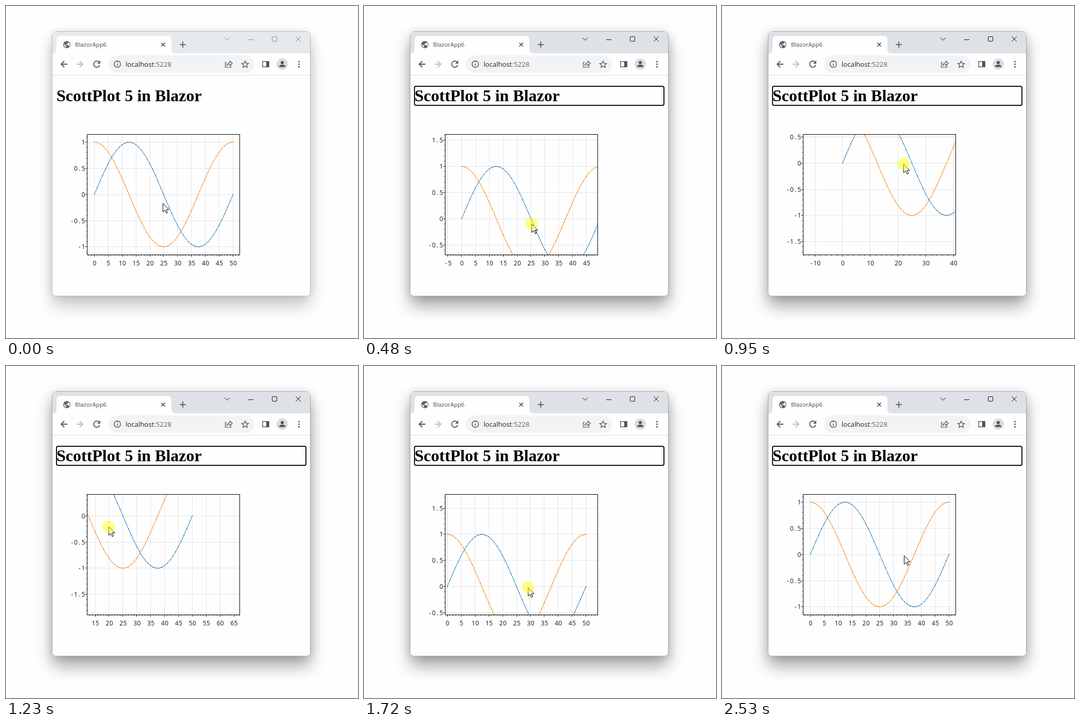
An HTML page with a canvas for the animation above (2.6 s loop, 683 by 645 pixels).

```html
<!DOCTYPE html>
<html lang="en">
<head>
<meta charset="utf-8">
<title>ScottPlot 5 in Blazor</title>
<style>
  html, body { margin: 0; width: 100%; height: 100%; overflow: hidden; background: #fefefe; }
  .window, svg, canvas { position: absolute; left: 0; top: 0; }
  .window {
    left: 90px; top: 50px; width: 500px; height: 513px; border-radius: 8px;
    box-shadow: 0 0 0 1px #b4b8ba, 0 20px 32px rgba(0,0,0,.2), 0 2px 20px rgba(0,0,0,.12);
  }
  .focused .window { box-shadow: 0 0 0 1px #a4a8aa, 0 20px 32px rgba(0,0,0,.34), 0 2px 20px rgba(0,0,0,.15); }
  .bar { fill: #e7eaed; }
  .focused .bar { fill: #dee1e6; }
  .caption { stroke: #85878a; stroke-width: 1; }
  .focused .caption { stroke: #111; }
  .ring { visibility: hidden; }
  .focused .ring { visibility: visible; }
  .line { fill: none; }
  .ui { font-family: "Open Sans", "Noto Sans", sans-serif; }
  .title { font: bold 32px "Liberation Serif", "Times New Roman", serif; }
</style>
</head>
<body>
<div class="window"></div>
<svg width="683" height="645" viewBox="0 0 683 645">
  <rect x="90" y="50" width="500" height="513" rx="7" fill="#fefefe"/>
  <path class="bar" d="M90 92V57q0-7 7-7H583q7 0 7 7V92z"/>
  <path fill="#fefefe" d="M90 92q8 0 8-8V66q0-8 8-8H313q8 0 8 8V84q0 8 8 8z"/>

  <circle cx="118" cy="75" r="7" fill="#5f6368"/>
  <path fill="#fefefe" d="M112.6 74l4 3.5v3l-1.2-.6q-3-2-2.8-5.900zM118 69.500l3.500 1-1.500 2.500-3 .5v2h4l1 2.500 1.200.5q1.500-4-.7-7l-2-1.500z"/>
  <text class="ui" x="134" y="79" font-size="11.4" fill="#45494d">BlazorApp6</text>

  <g class="line" stroke="#45494d" stroke-width="1.6">
    <path d="M301.500 71.500l7 7m0-7l-7 7M337 75h12m-6-6v12"/>
  </g>
  <g class="line caption">
    <path d="M424 61.500l5 5 5-5M470 65.500h10M562 59l10 10m0-10l-10 10"/>
    <rect x="516.5" y="59.500" width="9" height="9" rx="1.500"/>
  </g>

  <path stroke="#dadce0" d="M90 134.500H590"/>
  <rect x="198" y="96" width="284" height="34" rx="17" fill="#f1f3f4"/>
  <g class="line" stroke="#505458" stroke-width="1.800">
    <path d="M119 113h-12m6-6l-6 6 6 6"/>
    <path stroke="#b8babd" d="M137 113h12m-6-6l6 6-6 6"/>
    <path d="M181 109.500a6 6 0 1 0 .9 5M182 106.500v4.500h-4.500"/>
    <g stroke-width="1.400">
      <circle cx="216" cy="113" r="6.300"/>
      <path d="M216 112v4.500m0-8v1.600"/>
      <path stroke-width="1.200" d="M428 109.500h-2.500v9.500h11v-3M428.500 115.500q.5-5 6-5.500v-2.800l4.800 4.300-4.800 4.300v-2.800q-4 0-6 2.500z"/>
      <path d="M464 107l1.900 4.200 4.600.5-3.400 3.100.9 4.500-4-2.300-4 2.300.9-4.500-3.400-3.100 4.600-.5z"/>
      <rect x="498" y="107.800" width="12" height="10.500"/>
    </g>
  </g>
  <path fill="#505458" d="M505 107.500h5.500v11h-5.500z"/>
  <circle cx="536" cy="113" r="11" fill="#dadce0"/>
  <g fill="#505458">
    <circle cx="536" cy="110" r="3"/>
    <path d="M530 118.500v-1q0-3.500 6-3.500t6 3.500v1z"/>
    <circle cx="568.500" cy="108" r="1.600"/>
    <circle cx="568.500" cy="113" r="1.600"/>
    <circle cx="568.500" cy="118" r="1.600"/>
  </g>
  <text class="ui" x="232" y="118" font-size="13.200" fill="#202124">localhost<tspan fill="#5f6368">:5228</tspan></text>

  <text class="title" x="98" y="185">ScottPlot 5 in Blazor</text>
  <rect class="line ring" x="98" y="156" width="484" height="37" rx="3" stroke="#101010" stroke-width="2"/>
</svg>
<canvas width="683" height="645"></canvas>

<script>
const LOOP = 2600;
const LAST_MOVE = 29;
const SCALE = { x: 5.38, y: 101.7 };
const HOME = { x: 171.4, y: 366.2 };
const BOX = { left: 158, top: 249, right: 453, bottom: 483 };
const ctx = document.querySelector('canvas').getContext('2d');
const arrow = new Path2D('M.5.5v16.500l3.800-3.600 2.700 6 2.500-1.100-2.700-5.900h5.200z');

// Mouse path: tick, x, y
const path = [
  [0, 304, 383], [1, 297, 371], [6, 315, 418], [7, 325, 423], [10, 372, 392],
  [13, 359.5, 310], [14, 352, 307], [17, 218, 296], [18, 199, 312],
  [21, 197.5, 408], [22, 213, 423], [25, 318, 430], [28, 353, 368], [29, 353, 368]
];

// Ticks last 70 ms, apart from three that last 60 ms
const tickStart = k => 70 * k - 10 * ((k > 2) + (k > 8) + (k > 11));

function tickAt(time) {
  let k = 0;
  while (k < LAST_MOVE && tickStart(k + 1) <= time) k++;
  return k;
}

function slope(i, axis) {
  const a = path[Math.max(0, i - 1)], b = path[Math.min(path.length - 1, i + 1)];
  return (b[axis] - a[axis]) / (b[0] - a[0]);
}

function mouseAt(k) {
  let i = 0;
  while (i < path.length - 2 && path[i + 1][0] <= k) i++;
  const a = path[i], b = path[i + 1], span = b[0] - a[0], u = (k - a[0]) / span;
  const hermite = axis =>
    a[axis] * (1 + 2 * u) * (1 - u) ** 2 + b[axis] * u * u * (3 - 2 * u) +
    span * (slope(i, axis) * u * (1 - u) ** 2 - slope(i + 1, axis) * u * u * (1 - u));
  return { x: hermite(1), y: hermite(2) };
}

// The plot trails the mouse by one tick
function originAt(k) {
  const mouse = mouseAt(Math.max(1, k - 1)), press = mouseAt(1);
  return { x: HOME.x + mouse.x - press.x, y: HOME.y + mouse.y - press.y };
}

function line(x1, y1, x2, y2, color) {
  ctx.strokeStyle = color;
  ctx.beginPath();
  ctx.moveTo(x1, y1);
  ctx.lineTo(x2, y2);
  ctx.stroke();
}

// Fixed-pitch tick label centred on x
function label(text, x, y) {
  const pitch = 7.2;
  [...text].forEach((char, i) => ctx.fillText(char, x + (i - (text.length - 1) / 2) * pitch, y));
}

function drawTicks(origin) {
  const { left, top, right, bottom } = BOX;
  const minX = (left - origin.x) / SCALE.x;
  const minor = minX <= -10 ? 2 : 1;
  ctx.font = '12px "Noto Sans", "Open Sans", sans-serif';
  ctx.textAlign = 'center';
  ctx.fillStyle = '#222';
  for (let i = Math.ceil(minX / minor); ; i++) {
    const x = origin.x + i * minor * SCALE.x, px = Math.floor(x) + .5;
    if (x > right + .9) break;
    const major = i % 5 === 0;
    if (major) {
      line(px, top, px, bottom, 'rgba(0,0,0,.1)');
      label(String(i * minor), x + .5, 504);
    }
    line(px, bottom, px, bottom + (major ? 4 : 2), '#000');
  }
  for (let i = Math.ceil((origin.y - bottom) / SCALE.y * 10); ; i++) {
    const y = origin.y - i / 10 * SCALE.y, py = Math.floor(y) + .5;
    if (y < top) break;
    const major = i % 5 === 0;
    if (major) {
      const text = String(i / 10);
      line(left, py, right, py, 'rgba(0,0,0,.1)');
      label(text, 153.5 - text.length * 3.6, y + 4.5);
    }
    line(left - (major ? 4 : 2), py, left, py, '#000');
  }
}

function drawCurve(origin, wave, color) {
  const points = Array.from({ length: 51 }, (_, i) =>
    [origin.x + i * SCALE.x, origin.y - wave(i * Math.PI / 25) * SCALE.y]);
  ctx.strokeStyle = ctx.fillStyle = color;
  ctx.beginPath();
  points.forEach(p => ctx.lineTo(...p));
  ctx.stroke();
  for (const [x, y] of points) {
    ctx.beginPath();
    ctx.arc(x, y, .9, 0, 7);
    ctx.fill();
  }
}

function drawPlot(origin) {
  const { left, top, right, bottom } = BOX;
  ctx.lineWidth = 1;
  drawTicks(origin);
  ctx.save();
  ctx.beginPath();
  ctx.rect(left, top, right - left + 1, bottom - top);
  ctx.clip();
  drawCurve(origin, Math.sin, '#1f77b4');
  drawCurve(origin, Math.cos, '#ff7f0e');
  ctx.restore();
  ctx.strokeStyle = '#000';
  ctx.strokeRect(left - .5, top + .5, right - left + 1, bottom - top);
}

function drawMouse({ x, y }, pressed) {
  ctx.save();
  ctx.translate(Math.round(x), Math.round(y));
  ctx.fillStyle = '#fff';
  ctx.fill(arrow);
  ctx.strokeStyle = '#000';
  ctx.stroke(arrow);
  if (pressed) {
    ctx.fillStyle = 'rgba(255,255,0,.47)';
    ctx.beginPath();
    ctx.arc(0, 0, 12, 0, 7);
    ctx.fill();
  }
  ctx.restore();
}

function draw(now) {
  const time = now % LOOP, k = tickAt(time);
  const dragging = k >= 1 && k < LAST_MOVE;
  const clicking = time >= 2330 && time < 2460;
  document.body.className = k ? 'focused' : '';
  ctx.clearRect(0, 0, 683, 645);
  drawPlot(time >= 2530 ? HOME : originAt(k));
  drawMouse(mouseAt(k), dragging || clicking);
  requestAnimationFrame(draw);
}
requestAnimationFrame(draw);
</script>
</body>
</html>
```
